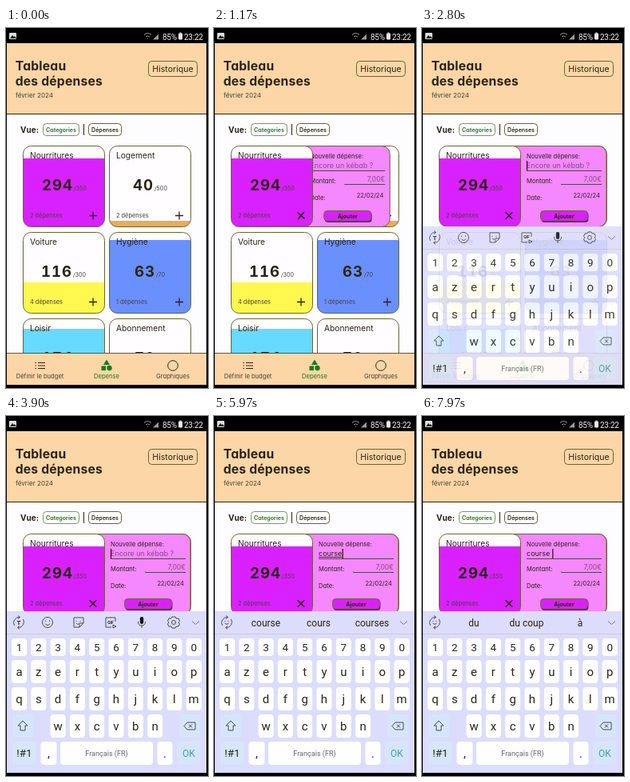
These frames come from a looping animation (253 px wide and 450 px high, 8000 ms). An HTML page:

```html
<!DOCTYPE html>
<html lang="fr">
<head>
<meta charset="utf-8">
<title>Tableau des dépenses</title>
<style>
html, body { margin: 0; width: 100%; height: 100%; overflow: hidden; background: #000; }
svg { display: block; width: 100%; height: 100%; }
text { font-family: Inter, sans-serif; font-feature-settings: "cv11"; fill: #2a2415; white-space: pre; }
.kb text, .bar text { font-family: Roboto, sans-serif; }
.bar text { fill: #eee; letter-spacing: -.25px; }
.title { font-weight: 700; letter-spacing: .2px; }
.amount { font-weight: 700; letter-spacing: 1px; font-feature-settings: "tnum"; }
.b { font-weight: 700; }
.m { text-anchor: middle; }
.e { text-anchor: end; }
.dim { fill: #454338; }
.green { fill: #157a1c; }
.line { fill: none; stroke: #2a2415; stroke-width: 1; }
.kb .line { stroke: #4c4c4c; }
.edge { fill: none; stroke: #6c6530; stroke-width: 1; }
</style>
</head>
<body>
<svg id="stage" viewBox="0 0 253 450"></svg>
<script>
const LOOP = 8000, OPEN = 940, FOCUS = 2560;
const TYPED = [[4520, 'c'], [4750, 'co'], [5000, 'cou'], [5300, 'cour'], [5560, 'cours'], [5800, 'course'], [6600, 'course ']];

const text = (x, y, size, str, cls = '', more = '') =>
  `<text x="${x}" y="${y}" font-size="${size}" class="${cls}" ${more}>${str}</text>`;
const rect = (x, y, w, h, fill, r = 0, more = '') =>
  `<rect x="${x}" y="${y}" width="${w}" height="${h}" rx="${r}" fill="${fill}" ${more}/>`;
const path = (d, more = '') => `<path class="line" d="${d}" ${more}/>`;
const at = (x, y, body, id = '') => `<g id="${id}" transform="translate(${x} ${y})">${body}</g>`;

function card(i, title, amount, end, budget, count, fill, top) {
  const x = 21.5 + (i % 2) * 108, y = 147.5 + (i >> 1) * 108;
  return at(x, y,
    rect(0, 0, 102, 101, '#fffdff', 10) +
    (fill ? `<g clip-path="url(#round)">${rect(0, top, 102, 101 - top, fill)}</g>` : '') +
    rect(0, 0, 102, 101, 'none', 10, 'class="edge"') +
    text(8.5, 15.5, 10.2, title) +
    text(end + 1.5, 55, 18.6, amount, 'amount e') +
    text(end + 2.5, 55.5, 7.2, '/' + budget, 'dim') +
    text(8.5, 89.5, 7.4, count, 'dim') +
    at(87.5, 87, path('M-5 0H5M0-5V5', `id="plus${i}" style="stroke-width:1.3"`)));
}

const statusBar = `<g class="bar">` +
  rect(4, 6, 9, 8, '#ddd', 1) + path('M5 13l3-4 2 2 1-1 2 3z', 'style="fill:#222;stroke:none"') +
  path('M173 8.500q4.500-4 9 0M175 11q2.500-2 5 0M177 13h1', 'style="stroke:#999"') +
  path('M184 14.500h7v-7z', 'style="fill:#999;stroke:none"') +
  text(196, 14.5, 10, '85%') +
  rect(216, 6.5, 5, 8, '#eee', 1) + rect(217.5, 5.5, 2, 1, '#eee') +
  text(223, 14.5, 10, '23:22') + '</g>';

const header = rect(1, 19, 250, 88, '#fdd6a7') + path('M1 107.5H251') +
  text(11.7, 52.5, 15.7, 'Tableau', 'title') + text(11.7, 71.5, 15.7, 'des dépenses', 'title') +
  text(12, 87, 8.1, 'février 2024', 'dim') +
  rect(178.5, 41.5, 61, 19, 'none', 4, 'class="edge"') + text(209, 54.5, 10.6, 'Historique', 'm') +
  text(18, 131, 10, 'Vue:', 'b') +
  rect(46.5, 119.5, 45, 15, 'none', 4, 'class="edge" style="stroke:#7f9a45"') +
  text(69, 130, 7, 'Categories', 'b m', 'style="fill:#3f7a2a"') +
  path('M97.5 120V134') +
  rect(103.5, 119.5, 41, 15, 'none', 4, 'class="edge"') + text(124, 130, 7, 'Dépenses', 'm', 'font-weight="600"');

const panel = rect(100, 147.5, 131, 101, '#f587ff', 10, 'class="edge" style="fill:#f587ff"') +
  text(131, 163, 7.6, 'Nouvelle dépense:') +
  text(131, 175, 9, 'Encore un kébab ?', '', 'id="hint" style="fill:#80507f"') +
  text(131, 175, 9, '', '', 'id="field"') +
  path('M131 178.5H225', 'style="stroke:#5c4058"') +
  path('M0 166V178', 'id="caret" style="stroke-width:1.3"') +
  text(131, 194, 7.7, 'Montant:') + text(225, 192, 8.6, '7,00€', 'e', 'style="fill:#80507f"') +
  path('M174 195.5H225', 'style="stroke:#5c4058"') +
  text(131, 215, 7.7, 'Date:') + text(223, 212, 7.6, '22/02/24', 'e') +
  rect(149.5, 230, 59, 13, '#58306a', 4) +
  rect(148.5, 228.5, 59, 12.5, '#d921ff', 4, 'class="edge" style="fill:#d921ff"') +
  text(178, 237.5, 7, 'Ajouter', 'b m');

const nav = rect(1, 406, 250, 40, '#fdd6a7') + path('M1 406.5H251', 'style="stroke:#6b5140"') +
  path('M40 418.5H49M40 422H49M40 425.5H49M36.5 418.5H38M36.5 422H38M36.5 425.5H38') +
  `<g class="green"><path d="M126 414.5l4 6.5h-8z"/><circle cx="129.5" cy="425" r="3.2"/><path d="M119.5 422.5h5.5v5.5h-5.5z"/></g>` +
  '<circle class="line" cx="209" cy="422" r="6.3"/>' +
  text(42.5, 438, 7.6, 'Définir le budget', 'm dim') +
  text(126, 438, 7.6, 'Depense', 'm green') + text(209, 438, 7.7, 'Graphiques', 'm dim');

const face = '<circle class="line" r="6.5"/><path class="line" d="M-3 1.5q3 4 6 0M-2.5-2.5v1.5M2.5-2.5v1.5"/>';
const turn = path('M-5.5 4A7 7 0 0 1 1-6.5M5.5-4A7 7 0 0 1-1 6.5M-1-8.5L1.5-6.5-1-4.5M1 8.5L-1.5 6.5 1 4.5');
const tools =
  at(16, 258, turn + text(0, 3, 8, 'T', 'b m')) +
  at(52, 258, face) +
  at(91, 258, path('M-6-6H6V1L1 6H-6zM1 6V1H6M-3-2v1M2-2v1M-3 1q1 2 3 1')) +
  at(131, 258, path('M6-1V-6H-6V6H1M3 3l4 2-4 2z') + text(0, 1.5, 5, 'GIF', 'b m')) +
  at(170, 258, rect(-2.2, -7, 4.4, 9, '#151515', 2.2) + path('M-4.5-1q0 5 4.5 5t4.5-5M0 4V7')) +
  at(210, 258, path('M-2-7H2L3-5 6-5 7.5-1.5 6 0 7.5 2 6 5H3L2 7H-2L-3 5H-6L-7.5 2-6 0-7.5-1.5-6-5H-3z') + '<circle class="line" r="2.5"/>');
const suggest = at(16, 258, turn + path('M-2.5 1q2.5 3 5 0M-2-2v1M2-2v1')) +
  [65, 131, 198].map((x, i) => text(x, 262.5, 12, '', 'm', `id="word${i}"`)).join('');

const keyX = i => 16.5 + i * 24.3;
const key = (x, y, w, h, label, size = 15, fill = '#fff') =>
  rect(x - w / 2, y - h / 2, w, h, fill, 4) + text(x, y + size * .34, size, label, 'm');
const row = (chars, from, y, h, size) =>
  [...chars].map((c, i) => key(keyX(i + from), y, 19, h, c, size)).join('');
const SOFT = '#d5e6fb';
const keyboard = rect(1, 244, 250, 260, '#dcdcfc') + path('M1 272.5H251', 'style="stroke:#cbcbd0"') +
  `<g id="tools">${tools}</g><g id="suggest">${suggest}</g>` + path('M233 256.5l4.5 4 4.5-4', 'style="stroke:#777"') +
  row('1234567890', 0, 289, 22, 13.5) +
  row('azertyuiop', 0, 319.5, 29, 15) + row('qsdfghjklm', 0, 353.5, 29, 15) + row('wxcvbn', 2, 387.5, 29, 15) +
  key(21, 387.5, 26, 29, '', 12, SOFT) + path('M21 381l6 6h-3v6h-6v-6h-3z') +
  key(230, 387.5, 26, 29, '', 12, SOFT) + path('M223 387.5l4-4.5h10v9h-10zM229 385.5l4 4M233 385.5l-4 4') +
  key(23, 421.5, 30, 29, '!#1', 13.5, SOFT) + key(53.5, 421.5, 20, 29, ',') +
  key(126, 421.5, 116, 29, '<tspan fill="#666">Français (FR)</tspan>', 9.1) + key(199, 421.5, 19, 29, '.') +
  key(229, 421.5, 29, 29, '<tspan fill="#4a9aa5">OK</tspan>', 12, SOFT);

document.getElementById('stage').innerHTML =
  `<defs><clipPath id="round">${rect(0, 0, 102, 101, '#000', 10)}</clipPath>
  <clipPath id="right">${rect(72, 140, 170, 120, '#000')}</clipPath>
  <clipPath id="screen">${rect(1, 0, 250, 446, '#000')}</clipPath></defs>
  <g clip-path="url(#screen)">` + rect(1, 19, 250, 427, '#fdfcff') + statusBar + header +
  card(1, 'Logement', '40', 54, 500, '2 dépenses', '#e9ad55', 93.5) +
  `<g clip-path="url(#right)">${at(0, 0, panel, 'panel')}</g>` +
  card(0, 'Nourritures', '294', 61, 350, '2 dépenses', '#d921ff', 15.5) +
  card(2, 'Voiture', '116', 60, 300, '4 dépenses', '#fff84e', 62.5) +
  card(3, 'Hygiène', '63', 56, 70, '1 dépenses', '#6a90ff', 9.5) +
  card(4, 'Loisir', '174', 61, 250, '3 dépenses', '#66daff', 12.5) +
  card(5, 'Abonnement', '70', 56, 100, '2 dépenses') +
  nav + `<g id="kb" class="kb">${keyboard}</g></g>`;

const $ = id => document.getElementById(id);
const clamp = v => Math.max(0, Math.min(1, v));
const show = (id, on) => $(id).style.display = on ? '' : 'none';

function words(t) {
  if (t >= 6600) return ['du', 'du coup', 'à'];
  if (t >= 5800) return ['course', 'cours', 'courses'];
  if (t >= 5560) return ['cours', 'course', 'courses'];
  return ['cour', 'cours', 'court'];
}

function draw(t) {
  const open = 1 - (1 - clamp((t - OPEN) / 430)) ** 3;
  $('panel').setAttribute('transform', `translate(${(open - 1) * 108} 0)`);
  $('plus0').setAttribute('transform', `rotate(${open * 45}) scale(${1 + open * .2})`);

  const rise = clamp((t - FOCUS) / 260);
  show('kb', rise > 0);
  $('kb').setAttribute('transform', `translate(0 ${(1 - rise) * 54})`);
  $('kb').setAttribute('opacity', rise ** 1.5);

  const [last, typed] = TYPED.filter(k => k[0] <= t).pop() || [FOCUS, ''];
  const field = $('field');
  field.textContent = typed;
  field.style.textDecoration = typed.endsWith(' ') ? 'none' : 'underline';
  show('hint', !typed);
  const caretX = 131.5 + (typed ? field.getComputedTextLength() + .5 : 0);
  $('caret').setAttribute('transform', `translate(${caretX} 0)`);
  show('caret', t >= FOCUS && (t - last) % 1000 < 500);

  const hints = t >= 5300;
  show('tools', !hints);
  show('suggest', hints);
  words(t).forEach((w, i) => $('word' + i).textContent = w);
}

function frame() {
  draw(performance.now() % LOOP);
  requestAnimationFrame(frame);
}
frame();
</script>
</body>
</html>
```
